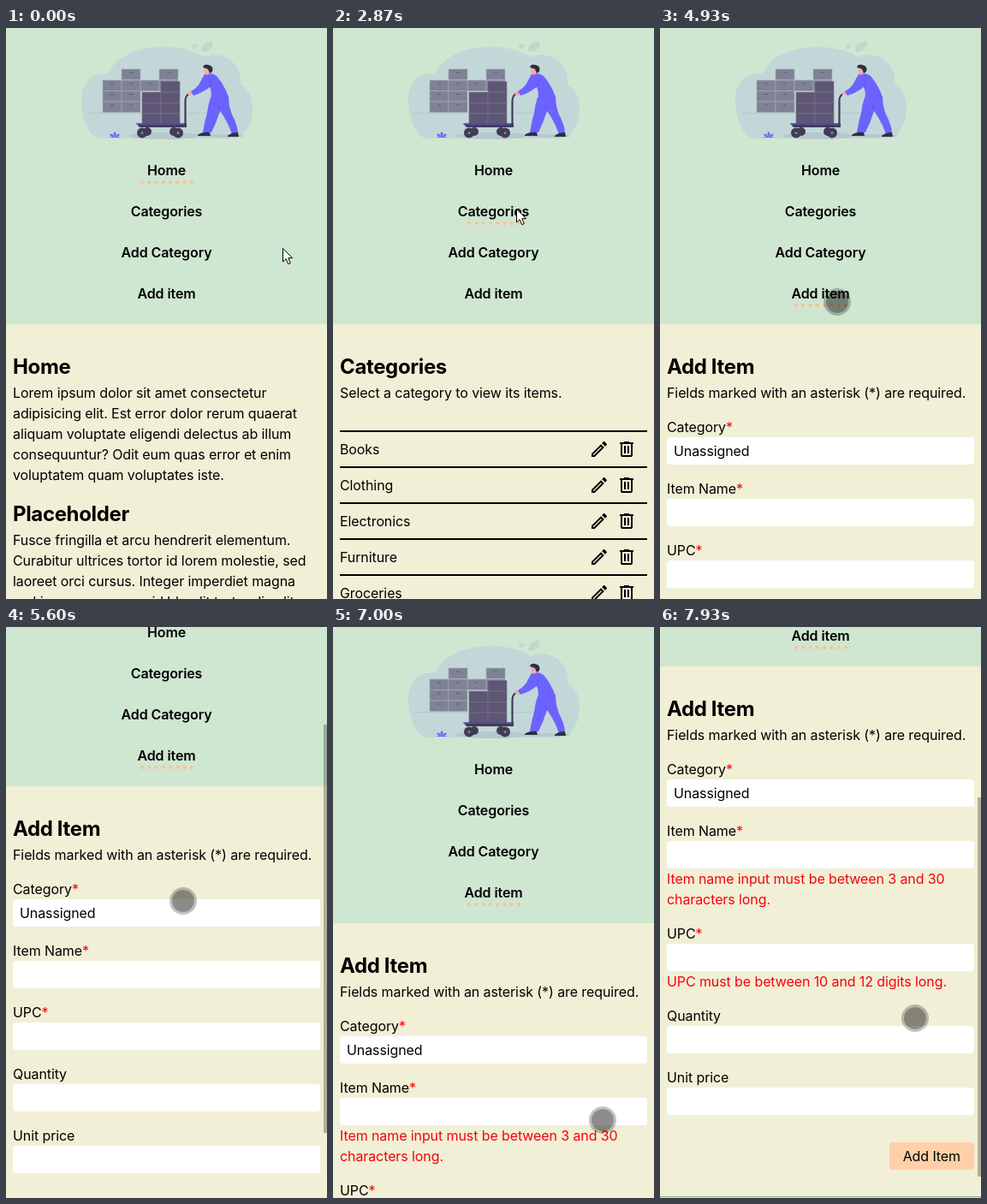
Recreate the animation shown at these times as an HTML page. Size 375 px wide and 667 px high, loop 8 s.

```html
<!DOCTYPE html>
<html lang="en">
<head>
<meta charset="utf-8">
<title>Inventory</title>
<style>
  html, body { margin: 0; width: 100%; height: 100%; overflow: hidden; }
  body { position: relative; background: #f1efd6; color: #000; font: 16px/24px Inter, sans-serif; letter-spacing: -.006em; }
  #doc { position: absolute; left: 0; top: 0; width: 375px; }
  header { position: absolute; top: 0; width: 375px; height: 346px; background: #cfe6d1; }
  header svg { position: absolute; left: 0; top: 0; }
  nav div { position: absolute; width: 375px; text-align: center; font-weight: 600; }
  #dots { position: absolute; left: 187.5px; height: 0; border-bottom: 4px dotted #fdc08f; transform: translateX(-50%); }
  main { position: absolute; left: 8px; top: 378px; width: 359px; white-space: nowrap; }
  h2 { margin: 0; font: 700 24px/36px Inter, sans-serif; letter-spacing: -.015em; }
  p { margin: 0 0 16px; }
  p.gap { margin-bottom: 32px; }
  i { color: #f00; font-style: normal; }
  .box { height: 32px; line-height: 32px; padding-left: 8px; margin-bottom: 16px; background: #fff; border-radius: 4px; }
  .err { color: #f8000c; margin: -16px 0 16px; }
  .btn { width: max-content; margin: 32px 0 0 auto; padding: 0 16px; line-height: 32px; background: #ffd0a8; border-radius: 3px; }
  .row { position: relative; height: 40px; line-height: 40px; border-top: 2px solid #000; }
  .row svg { position: absolute; top: 8px; }
  footer { position: absolute; width: 375px; height: 39px; background: #cfe6d1; border-top: 1px solid #92ad95; }
  footer span { position: absolute; left: 0; width: 351px; top: 4px; text-align: center; color: #333; }
  footer b { position: absolute; left: 347px; top: 4px; width: 24px; height: 24px; border-radius: 50%; background: #111; }
  #thumb { position: absolute; left: 371px; width: 4px; background: rgba(0, 0, 0, .27); }
  #arrow, #touch { position: absolute; left: 0; top: 0; overflow: visible; }
  #touch { width: 26px; height: 26px; margin: -16px; border: 3px solid rgba(0, 0, 0, .24); border-radius: 50%;
    background: rgba(0, 0, 0, .45); background-clip: padding-box; }
</style>
</head>
<body>
<div id="doc">
  <header>
    <svg width="375" height="140">
      <path fill="#c3d7d8" d="M108 129C95 124 88 104 88 84C88 63 102 51 119 54C127 34 154 22 184 22C206 22 222 28 231 34C253 24 277 42 274 66C284 72 288 82 288 93C288 113 277 129 266 129Z"/>
      <path stroke="#b3c8ca" d="M96 99.500H160M212 99.500H250"/>
      <ellipse cx="185" cy="126" rx="42" ry="4" fill="#b5c8ce"/>
      <ellipse cx="249" cy="126" rx="29" ry="2" fill="#b5c8ce"/>
      <g id="crates"></g>
      <path fill="#3f3d56" d="M152 111.500H211V116H156Z"/>
      <path fill="#5650a8" d="M152 111.500H211V113H153Z"/>
      <path fill="none" stroke="#3f3d56" stroke-width="2.200" d="M209.500 115V86Q209 79 215 76"/>
      <g fill="#3f3d56">
        <circle cx="159" cy="122.500" r="6"/><circle cx="165" cy="121" r="5"/>
        <circle cx="196" cy="121" r="5"/><circle cx="201" cy="122.500" r="6"/>
      </g>
      <g fill="#85829a">
        <circle cx="159" cy="122.500" r="1.500"/><circle cx="201" cy="122.500" r="1.500"/>
      </g>
      <circle cx="215" cy="76.500" r="2.500" fill="#f4a9a9"/>
      <path fill="#6c63ff" d="M239 81L260 79Q260 91 264 101Q270 112 271 122L264 124Q259 109 250 97Q246 110 240 122H230Q232 109 235 99Q236 90 239 81Z"/>
      <path fill="#6c63ff" d="M232 54Q240 51 246 56Q255 66 260 81L239 85Q241 75 238 69Q229 76 219 79L216 74Q225 69 228 61Z"/>
      <path fill="none" stroke="#5a52e0" stroke-width=".8" d="M240 61L238 69M250 97L248 90"/>
      <path fill="#2f2e41" d="M224 125Q229 121 238 122L239 126H224ZM259 126Q263 122 271 122L272 127H259Z"/>
      <path fill="#f4a9a9" d="M231 46H239V53L234 55Q231 51 231 46Z"/>
      <path fill="#2f2e41" d="M230 46Q231 42 236 43Q243 44 241 51L238 53L236 48Z"/>
      <g fill="#c0d9cf" stroke="#b9d3c8" stroke-width=".8">
        <path d="M229 27Q227 18 241 16Q242 27 229 27L237 19"/>
        <path d="M217 21Q221 19 223 20Q221 24 219 24Z"/>
      </g>
      <path fill="#6c63ff" d="M120 128Q127 125 134 128ZM121 124Q125 123 126 127Q122 127 121 124M133 124Q129 123 128 127Q132 127 133 124M127 121Q130 124 127 127Q124 124 127 121"/>
    </svg>
    <nav id="nav"></nav>
    <div id="dots"></div>
  </header>
  <main>
    <section>
      <h2>Home</h2>
      <p>Lorem ipsum dolor sit amet consectetur<br>adipisicing elit. Est error dolor rerum quaerat<br>aliquam voluptate eligendi delectus ab illum<br>consequuntur? Odit eum quas error et enim<br>voluptatem quam voluptates iste.</p>
      <h2>Placeholder</h2>
      <p>Fusce fringilla et arcu hendrerit elementum.<br>Curabitur ultrices tortor id lorem molestie, sed<br>laoreet orci cursus. Integer imperdiet magna<br>sed ipsum accumsan id blandit tortor dis elit</p>
    </section>
    <section id="list">
      <div class="text"><h2>Categories</h2><p class="gap">Select a category to view its items.</p></div>
    </section>
    <section>
      <h2>Add Category</h2>
      <p>Fields marked with an asterisk (<i>*</i>) are required.</p>
      Category<i>*</i><div class="box"></div>
      <div class="btn">Add Category</div>
    </section>
    <section>
      <h2>Add Item</h2>
      <p>Fields marked with an asterisk (*) are required.</p>
      Category<i>*</i><div class="box">Unassigned</div>
      Item Name<i>*</i><div class="box"></div>
      <div class="err">Item name input must be between 3 and 30<br>characters long.</div>
      UPC<i>*</i><div class="box"></div>
      <div class="err">UPC must be between 10 and 12 digits long.</div>
      Quantity<div class="box"></div>
      Unit price<div class="box"></div>
      <div class="btn">Add Item</div>
    </section>
  </main>
  <footer><span>placeholder</span><b></b></footer>
</div>
<div id="thumb"></div>
<svg id="arrow" width="13" height="20"><path d="M.5 .5V16L4.100 12.700L6.700 18.700L9.300 17.600L6.800 11.700H11.500Z" fill="#fff" stroke="#000"/></svg>
<div id="touch"></div>
<script>
const $ = id => document.getElementById(id);
const all = sel => [...document.querySelectorAll(sel)];

// Static parts built from short rules
const crate = (x, y, fill, line) =>
  `<rect x="${x}" y="${y}" width="22" height="12.500" fill="${fill}" stroke="${line}" stroke-width=".6"/>` +
  `<path d="M${x + 9} ${y + 4}h4" stroke="#56546a" stroke-width=".8"/>`;
const back = (x, y) => crate(x, y, '#7f8294', '#a5adba');
const front = (x, y) => crate(x, y, '#5e5674', '#7b738f');
let crates = '';
for (const [x, y] of [[135, 48], [179, 48], [157, 61], [179, 61]]) crates += back(x, y);
for (let i = 0; i < 6; i++) crates += back(113 + i % 2 * 22, 61 + (i >> 1) * 12.5);
for (let i = 1; i < 8; i++) crates += front(159 + i % 2 * 22, 62.5 + (i >> 1) * 12.5);
$('crates').innerHTML = crates;

$('nav').innerHTML = ['Home', 'Categories', 'Add Category', 'Add item']
  .map((s, i) => `<div class="text" style="top:${154 + 48 * i}px">${s}</div>`).join('');

const pencil = 'M14.060 9.020l.92.92L5.920 19H5v-.92l9.060-9.060M17.660 3c-.25 0-.51.1-.7.29l-1.830 1.830 3.750 3.750 1.830-1.830c.39-.39.39-1.040 0-1.410l-2.340-2.340c-.2-.2-.45-.29-.71-.29zm-3.600 3.190L3 17.250V21h3.750L17.810 9.940z';
const bin = 'M7 21q-.8 0-1.400-.6T5 19V6H4V4h5V3h6v1h5v2h-1v13q0 .8-.6 1.400T17 21zM17 6H7v13h10zM9 17h2V8H9zm4 0h2V8h-2z';
const icon = (x, d) => `<svg width="24" height="24" style="left:${x}px"><path d="${d}"/></svg>`;
$('list').innerHTML += ['Books', 'Clothing', 'Electronics', 'Furniture', 'Groceries', 'Kitchen']
  .map(s => `<div class="row"><span class="text">${s}</span>${icon(291, pencil)}${icon(323, bin)}</div>`).join('');

// Timeline tables: [ms, value, ...]
const LOOP = 8000;
const scrollKeys = [[5400, 0], [5467, 45], [5600, 160], [5733, 240], [5867, 266], [6332, 266], [6333, 0],
  [7200, 0], [7333, 45], [7466.5, 137], [7600, 225], [7800, 300]];
const barKeys = [[2132, 0], [2133, 1], [2333, 1], [2533, 0], [4665, 0], [4666, 1], [4733, 1], [4933, 0],
  [5465, 0], [5466, 1], [6067, 1], [6266, 0], [6399, 0], [6400, 1], [6467, 1], [6600, 0], [7200, 0], [7266, 1]];
const pointKeys = [[1000, 323, 257], [1267, 262, 228], [1533, 220, 218], [2130, 220, 218], [2533, 214, 211],
  [2867, 214, 211], [3000, 262, 236], [3133, 232, 258], [3450, 232, 258], [3667, 209, 320],
  [4332, 209, 320], [4333, 207, 320], [5867, 207, 320], [6267, 315, 576],
  [7000, 315, 576], [7200, 299, 468], [7800, 299, 468], [7933, 298, 457]];

function at(keys, t) {
  const i = keys.findIndex(k => k[0] > t);
  if (i < 0) return keys[keys.length - 1].slice(1);
  if (!i) return keys[0].slice(1);
  const a = keys[i - 1], b = keys[i], u = (t - a[0]) / (b[0] - a[0]);
  return a.slice(1).map((v, j) => v + (b[j + 1] - v) * u);
}

const pages = all('section'), errors = all('.err'), texts = all('.text'), footer = document.querySelector('footer');

function draw(ms) {
  // the picture changes 15 times a second
  const t = Math.floor((ms + 5) * .015) / .015;
  const page = t < 1733 ? 0 : t < 3266 ? 1 : t < 4333 ? 2 : 3;
  const failed = t >= 6333;
  const height = [1200, 961, 673, failed ? 1005 : 933][page];
  const scroll = Math.round(at(scrollKeys, t)[0]);

  pages.forEach((el, i) => el.style.display = i === page ? 'block' : 'none');
  errors.forEach(el => el.style.display = failed ? 'block' : 'none');
  const loading = t >= 1733 && t < 1930;
  texts.forEach(el => el.style.visibility = loading ? 'hidden' : 'visible');

  $('doc').style.top = -scroll + 'px';
  footer.style.top = height - (page === 2 ? 39 : 40) + 'px';
  $('dots').style.top = [178, 226, 274, 322][page] + 'px';
  $('dots').style.width = (page === 1 ? 62 * Math.min(1, (t - 1733) / 166) : 62) + 'px';

  const k = 667 / height;
  $('thumb').style.top = Math.round(scroll * k) + 'px';
  $('thumb').style.height = Math.round(667 * k) + 'px';
  $('thumb').style.opacity = at(barKeys, t)[0];

  const [x, y] = at(pointKeys, t).map(Math.round), touch = t >= 3599;
  $('arrow').style.display = touch ? 'none' : 'block';
  $('touch').style.display = touch ? 'block' : 'none';
  $(touch ? 'touch' : 'arrow').style.transform = `translate(${x}px,${y}px)`;
}

const start = performance.now();
function tick() {
  draw((performance.now() - start) % LOOP);
  requestAnimationFrame(tick);
}
tick();
</script>
</body>
</html>
```
